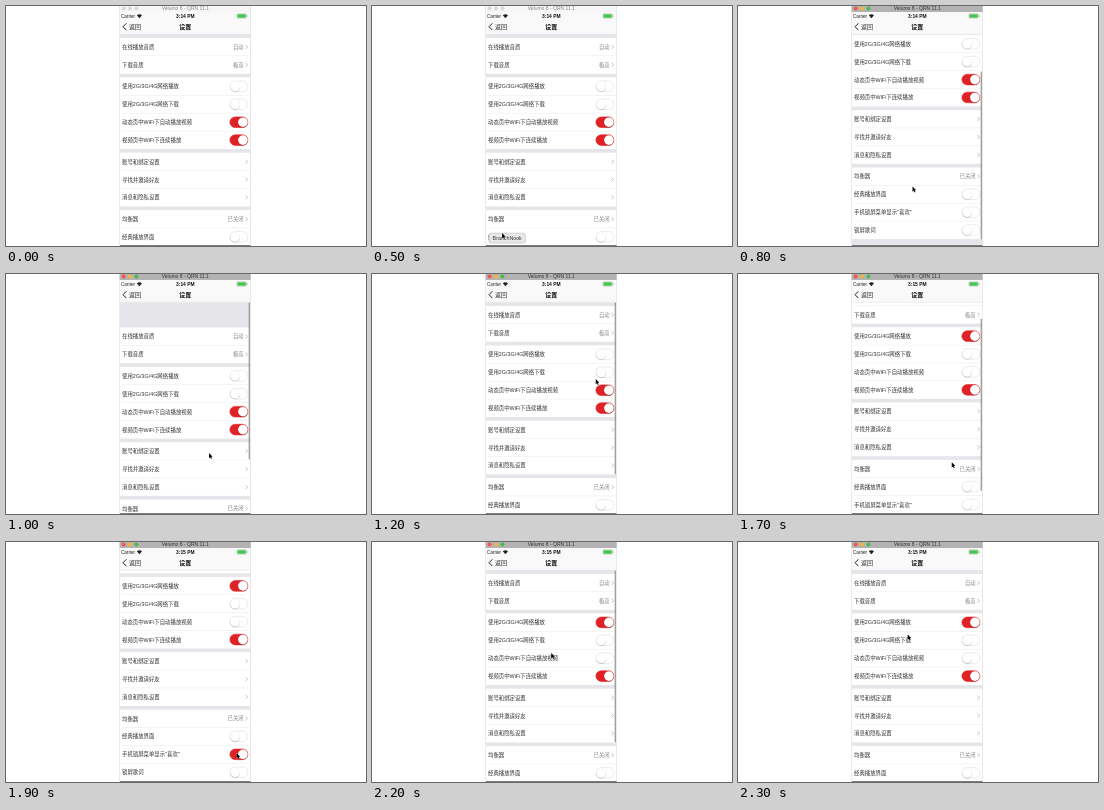
Animation, 360 px wide and 240 px high, one loop 2.4 s. Source, as an HTML page:

```html
<!DOCTYPE html>
<html lang="zh-CN">
<head>
<meta charset="utf-8">
<title>设置</title>
<style>
  html, body { margin: 0; width: 100%; height: 100%; overflow: hidden; background: #fff; }
  svg { display: block; width: 360px; height: 240px; }
  text { font-family: "Liberation Sans", "Noto Sans CJK SC", "Noto Sans CJK", sans-serif; }
</style>
</head>
<body>
<svg id="stage" viewBox="0 0 360 240"></svg>
<script>
(() => {
const LOOP = 2400, STEP = 100;
const LEFT = 114, RIGHT = 244.5, WIDTH = RIGHT - LEFT, MIDDLE = 179.3;
const NAV = 28.3, ROW = 17.9, GAP = 3.67, LIST_END = -36.5;
const GREY = '#e6e6ea', RED = '#df2226';
const stage = document.getElementById('stage');

function set(el, attrs) {
  for (const key in attrs) el.setAttribute(key, attrs[key]);
}
function add(parent, tag, attrs, content) {
  const el = document.createElementNS('http://www.w3.org/2000/svg', tag);
  set(el, attrs);
  if (content) el.textContent = content;
  parent.append(el);
  return el;
}
const rect = (parent, x, y, width, height, fill, more) =>
  add(parent, 'rect', { x, y, width, height, fill, ...more });
const label = (parent, x, mid, size, fill, content, more) =>
  add(parent, 'text', { x, y: mid + size * 0.37, 'font-size': size, fill, ...more }, content);
const stroke = (parent, d, color, width) =>
  add(parent, 'path', { d, fill: 'none', stroke: color, 'stroke-width': width });
const show = (el, on) => set(el, { visibility: on ? 'visible' : 'hidden' });
const centred = { 'text-anchor': 'middle' };
const heading = { ...centred, 'font-weight': 'bold' };

// A row has either a detail text or a switch, which may flip at a given time
const link = (name, detail = '') => ({ name, detail });
const option = (name, on, flip = Infinity) => ({ name, on, flip });
const groups = [
  [link('在线播放音质', '自动'), link('下载音质', '极高')],
  [option('使用2G/3G/4G网络播放', false, 1300), option('使用2G/3G/4G网络下载', false),
   option('动态页中WiFi下自动播放视频', true, 1400), option('视频页中WiFi下连续播放', true)],
  [link('账号和绑定设置'), link('寻找并邀请好友'), link('消息和隐私设置')],
  [link('均衡器', '已关闭'), option('经典播放界面', false),
   option('手机锁屏菜单显示"喜欢"', false, 1900), option('锁屏歌词', false)]
];

// Scrolling list
rect(stage, LEFT, NAV, WIDTH, 212, GREY);
const list = add(stage, 'g', {});
const switches = [];

function addSwitch(mid, row) {
  const track = rect(list, 223.9, mid - 5.3, 18, 10.6, '#fff', { rx: 5.3, 'stroke-width': 0.6 });
  const shade = add(list, 'circle', { cy: mid + 0.6, r: 5.1, fill: '#000', opacity: 0.17 });
  const knob = add(list, 'circle', { cy: mid, r: 4.8, fill: '#fff' });
  switches.push({ ...row, track, shade, knob });
}

function addRow(row, mid) {
  label(list, 116, mid, 5.4, '#333', row.name);
  if (row.flip) return addSwitch(mid, row);
  label(list, 237.5, mid, 5.3, '#888', row.detail, { 'text-anchor': 'end' });
  stroke(list, `M239.6 ${mid - 2}l2 2l-2 2`, '#aaa', 0.7);
}

let rowTop = NAV;
for (const group of groups) {
  rowTop += GAP;
  rect(list, LEFT, rowTop, WIDTH, ROW * group.length, '#fff');
  group.forEach((row, i) => {
    if (i) rect(list, 116, rowTop - 0.3, RIGHT - 116, 0.5, '#e9e9e9');
    addRow(row, rowTop + ROW / 2);
    rowTop += ROW;
  });
}

const scrollBar = rect(stage, 242.7, 0, 1.1, 0, '#8a8a8a', { rx: 0.5 });

// Status and navigation bars
rect(stage, LEFT, 6, WIDTH, NAV - 6, '#f9f9f9');
rect(stage, LEFT, NAV - 0.4, WIDTH, 0.4, '#d4d4d8');
label(stage, 115, 10, 4.6, '#222', 'Carrier');
add(stage, 'path', { d: 'M133.4 12.3L130.8 9.2Q133.4 7.2 136 9.2Z', fill: '#222' });
const clock = label(stage, MIDDLE, 10, 4.9, '#111', '3:14 PM', heading);
rect(stage, 230.8, 7.8, 9.6, 4.4, 'none', { rx: 1, stroke: '#9a9a9a', 'stroke-width': 0.4 });
rect(stage, 231.4, 8.3, 8.4, 3.4, '#43c84f', { rx: 0.6 });
rect(stage, 240.9, 9.3, 0.7, 1.5, '#9a9a9a');
stroke(stage, 'M120.4 17.3l-3.4 3.4l3.4 3.4', '#222', 1);
label(stage, 123, 20.7, 6, '#222', '返回');
label(stage, MIDDLE, 20.7, 6, '#111', '设置', heading);

// Window frame
const titleBar = rect(stage, LEFT - 0.5, 0, WIDTH + 1, 6, '#f6f6f6');
const title = label(stage, MIDDLE, 2.6, 5, '#888', 'Velumo 8 - QRN 11.1', centred);
const lights = ['#f4574f', '#eeb53c', '#46bd48'].map((color, i) => ({
  color, dot: add(stage, 'circle', { cx: 117.6 + i * 6.4, cy: 2.4, r: 2 })
}));
rect(stage, LEFT - 0.5, 0, 0.5, 240, '#d6d6d6');
rect(stage, RIGHT, 0, 0.5, 240, '#d6d6d6');
rect(stage, LEFT, 239, WIDTH, 1, '#7d7d7d');

// Dock tooltip and pointer
const tip = add(stage, 'g', {});
rect(tip, 117, 227.2, 36.4, 9.8, '#e9e9e9', { rx: 2, stroke: '#b9b9b9', 'stroke-width': 0.6 });
label(tip, 135.2, 232.2, 5.3, '#333', 'BranchNook', centred);
const pointer = add(stage, 'path', {
  d: 'M0 0V5.2L1.2 4.2L2 6L2.9 5.6L2.1 3.8H3.7Z',
  fill: '#000', stroke: '#fff', 'stroke-width': 0.5, 'paint-order': 'stroke'
});

// Key points: time, then value(s), eased in between
const scrollKeys = [[600, 0], [800, -42.6], [1000, 21.5], [1200, 0],
  [1600, 0], [1800, LIST_END], [2000, LIST_END], [2200, 0]];
const pointerKeys = [[200, 144, 250], [500, 130, 227], [800, 174.5, 180.5], [1000, 203, 179],
  [1300, 231, 79], [1500, 197, 165.5], [1900, 230.5, 211], [2300, 169.7, 92.5]];
const ease = k => k * k * (3 - 2 * k);

function at(keys, t) {
  const next = keys.findIndex(key => key[0] > t);
  if (next < 1) return keys.at(next).slice(1);
  const a = keys[next - 1], b = keys[next];
  const k = ease((t - a[0]) / (b[0] - a[0]));
  return a.slice(1).map((v, i) => v + (b[i + 1] - v) * k);
}

function drawScrollBar(scroll, moving) {
  const over = Math.max(scroll, LIST_END - scroll, 0);
  const height = 172 - over * 0.7;
  const part = Math.min(1, Math.max(0, scroll / LIST_END));
  set(scrollBar, { y: NAV + part * (205 - height), height });
  show(scrollBar, moving);
}

function draw(t) {
  const [scroll] = at(scrollKeys, t);
  const [x, y] = at(pointerKeys, t);
  set(list, { transform: `translate(0 ${scroll})` });
  set(pointer, { transform: `translate(${x} ${y})` });
  drawScrollBar(scroll, scroll !== at(scrollKeys, t - STEP)[0]);
  show(tip, t >= 400 && t < 600);

  const active = t >= 700;
  set(titleBar, { fill: active ? '#b4b2b3' : '#f6f6f6' });
  set(title, { fill: active ? '#333' : '#888' });
  for (const { dot, color } of lights) set(dot, { fill: active ? color : '#d9d9d9' });
  clock.textContent = t < 1700 ? '3:14 PM' : '3:15 PM';

  for (const s of switches) {
    const on = s.on !== (t >= s.flip);
    const cx = on ? 236.9 : 229.1;
    set(s.track, { fill: on ? RED : '#fff', stroke: on ? RED : '#dedede' });
    set(s.knob, { cx });
    set(s.shade, { cx });
  }
}

function tick(now) {
  draw(Math.floor((now % LOOP) / STEP) * STEP);
  requestAnimationFrame(tick);
}
draw(0);
requestAnimationFrame(tick);
})();
</script>
</body>
</html>
```
